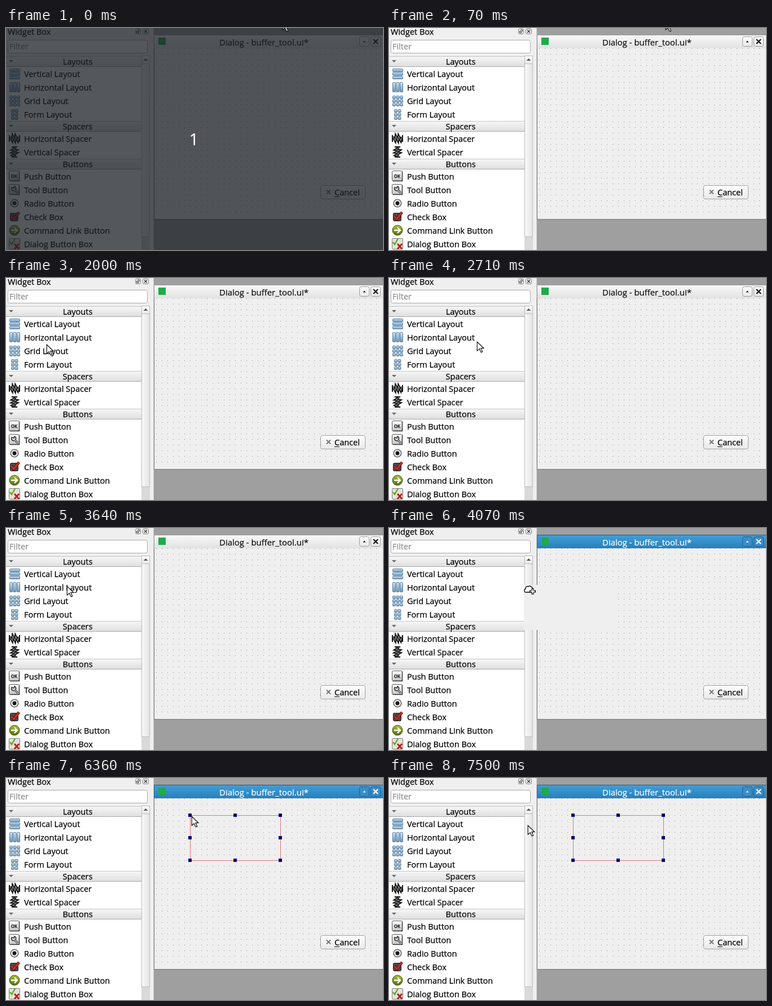
Write an HTML page that moves like this. It is 668x394 px and loops after 8000 ms.

```html
<!DOCTYPE html>
<html lang="en">
<head>
<meta charset="utf-8">
<title>Widget Box</title>
<style>
  html, body { margin: 0; width: 100%; height: 100%; overflow: hidden; background: #9f9f9f; }
  svg { display: block; width: 668px; height: 394px; }
  text { font: 14.5px "Open Sans", "Noto Sans", sans-serif; white-space: pre; }
</style>
</head>
<body>
<svg id="stage" viewBox="0 0 668 394" xmlns="http://www.w3.org/2000/svg"></svg>
<script>
const TICKS_PER_SECOND = 14;
const LOOP = 8000;

const rect = (x, y, w, h, fill, more = '') =>
  `<rect x="${x}" y="${y}" width="${w}" height="${h}" fill="${fill}" ${more}/>`;
const box = (x, y, w, h, fill, line, radius = 0) =>
  rect(x + .5, y + .5, w - 1, h - 1, fill, `stroke="${line}" rx="${radius}"`);
const path = (d, fill, line = 'none', width = 1) =>
  `<path d="${d}" fill="${fill}" stroke="${line}" stroke-width="${width}"/>`;
// A hairline stroke gives the labels their slightly heavier weight.
const text = (x, y, label, fill = '#000', more = '') =>
  `<text x="${x}" y="${y}" fill="${fill}" stroke="${fill}" stroke-width=".25" ${more}>${label}</text>`;
const group = (x, y, body) => `<g transform="translate(${x} ${y})">${body}</g>`;
const middle = 'text-anchor="middle"';
const range = n => [...Array(n).keys()];

const gradient = (id, top, bottom, direction = 'x2="0" y2="1"') =>
  `<linearGradient id="${id}" ${direction}><stop stop-color="${top}"/>` +
  `<stop offset="1" stop-color="${bottom}"/></linearGradient>`;

const defs = `<defs>
  ${gradient('header', '#f7f7f7', '#dedede')}
  ${gradient('button', '#fdfdfd', '#e9e9e9')}
  ${gradient('pane', '#d3e6f5', '#6796bd')}
  ${gradient('idleTitle', '#f8f8f8', '#e2e2e2')}
  ${gradient('activeTitle', '#429ed6', '#267fbd')}
  ${gradient('olive', '#a5bd38', '#536f0b')}
  ${gradient('thumb', '#f9f9f9', '#e4e4e4', '')}
  ${gradient('plate', '#ffffff', '#c4c4c4')}
  <pattern id="grid" x="266" y="36" width="10" height="10" patternUnits="userSpaceOnUse">
    ${rect(0, 0, 1, 1, '#858585')}</pattern>
</defs>`;

// Icons are drawn around their own centre.
const pane = (x, y, w, h) => box(x, y, w, h, 'url(#pane)', '#5b7e9c', 1);
const cells = (columns, rows, left) => range(columns * rows).map(i =>
  pane(left + i % columns * 6.5, -9 + Math.floor(i / columns) * 6.5, 6, 6)).join('');
const plate = box(-10, -10, 19, 19, 'url(#plate)', '#555', 2) +
  path('M-8 8.500H8.500V-8', 'none', '#333', 1.4);
const spring = path('M-9-6V6M9-6V6', 'none', '#111', 2) +
  path('M-8-3 -4 4 -3-4 1 4 2-4 6 4 8-3', 'none', '#111', 4.4) +
  path('M-8-3 -4 4 -3-4 1 4 2-4 6 4 8-3', 'none', '#aaa', 1);

const icons = {
  rows: range(3).map(i => pane(-9, -9 + i * 6.5, 19, 6)).join(''),
  columns: range(3).map(i => pane(-9 + i * 6.5, -9, 6, 18)).join(''),
  grid: cells(3, 3, -9),
  form: cells(2, 3, -6),
  spring,
  uprightSpring: `<g transform="rotate(90) scale(1 .85)">${spring}</g>`,
  push: plate + text(-.5, 2.5, 'OK', '#111', `${middle} style="font-size:8px;font-weight:600"`),
  tool: plate + path('M-5-4 A4 4 0 1 0 0-6 L-1-3 Z', '#ddd', '#333', 1.6) +
    path('M0 0 6 6', 'none', '#444', 3.6) + path('M0 0 6 6', 'none', '#ccc', 1.2),
  radio: '<circle r="6.800" fill="#e8e8e8" stroke="#666" stroke-width="1.600"/><circle r="3.400" fill="#151515"/>',
  check: box(-8, -7, 15, 15, '#4a4a4a', '#222', 2) +
    path('M-6-1 -1 4 8-8', 'none', '#6e0909', 5) + path('M-6-1 -1 4 8-8', 'none', '#c5302c', 3),
  command: '<circle r="9" fill="url(#olive)" stroke="#455a10"/>' +
    path('M-6 0H4M0-5 5 0 0 5', 'none', '#fff', 2.3),
  dialog: box(-10, -10, 20, 20, '#e6e2d9', '#777', 1) +
    path('M-8-3 -5 1 1-9', 'none', '#58a51b', 2.2) + path('M0 0 8 9M8 0 0 9', 'none', '#b91f1b', 2.8)
};

const sections = [
  { y: 50, name: 'Layouts', items: [['Vertical Layout', 'rows'], ['Horizontal Layout', 'columns'],
    ['Grid Layout', 'grid'], ['Form Layout', 'form']] },
  { y: 165, name: 'Spacers', items: [['Horizontal Spacer', 'spring'], ['Vertical Spacer', 'uprightSpring']] },
  { y: 232, name: 'Buttons', items: [['Push Button', 'push'], ['Tool Button', 'tool'],
    ['Radio Button', 'radio'], ['Check Box', 'check'], ['Command Link Button', 'command'],
    ['Dialog Button Box', 'dialog']] }
];

const section = ({ y, name, items }) =>
  rect(0, y, 240, 19, 'url(#header)') + rect(0, y, 240, 1, '#c4c4c4') + rect(0, y + 18, 240, 1, '#a9a9a9') +
  path(`M5 ${y + 7}h8l-4 4z`, '#666') + text(127, y + 15, name, '#000', middle) +
  items.map(([label, icon], i) =>
    group(15, y + 31 + i * 24, icons[icon]) + text(32, y + 37 + i * 24, label)).join('');

const panel = rect(0, 0, 262, 394, '#efefef') + rect(261, 0, 1, 394, '#d2d2d2') +
  text(3, 12, 'Widget Box') +
  box(229, 1, 10, 10, '#f7f7f7', '#777', 2) + box(231, 5, 4, 4, 'none', '#333') +
  path('M233.500 3.500h3v3', 'none', '#333') +
  box(242, 1, 11, 10, '#f7f7f7', '#777', 2) + path('M245 3.500l5 5m0-5l-5 5', 'none', '#333', 1.4) +
  box(3, 21, 248, 24, '#fff', '#aaa', 3) + text(6, 38, 'Filter', '#8d8d8d') +
  rect(0, 50, 240, 344, '#fff') + sections.map(section).join('') +
  rect(240, 50, 15, 344, '#d9d9d9') + box(240, 49, 15, 15, 'url(#button)', '#bbb') +
  path('M243.500 58h8l-4-4z', '#555') + box(240, 63, 15, 308, 'url(#thumb)', '#bbb');

const titleBar = (fill, ink, line, face) =>
  rect(262, 12, 406, 24, line) + rect(263, 13, 405, 23, `url(#${fill})`) +
  rect(270, 17, 13, 13, '#20aa4b') +
  text(457, 30.5, 'Dialog - buffer_tool.ui*', ink, `${middle} style="font-size:14.9px"`) +
  box(626, 15, 18, 18, face, line, 3) + path('M632.500 25.500h5l-2.500-3z', ink) +
  box(646, 15, 18, 18, face, line, 3) + path('M651 20l8 8m0-8l-8 8', 'none', ink, 2.2);

const dialog = rect(262, 12, 406, 328, '#777') + rect(263, 36, 405, 303, '#efefef') +
  rect(266, 36, 400, 300, 'url(#grid)') +
  box(557, 279, 80, 25, 'url(#button)', '#a0a0a0', 3) +
  path('M568 287.500l7 7m0-7l-7 7', 'none', '#777', 2) +
  text(582, 297, 'Cancel') + rect(582, 299, 9, 1, '#000');

const handles = range(9).filter(i => i !== 4).map(i => {
  const x = 323 + i % 3 * 80, y = 63 + Math.floor(i / 3) * 40;
  return rect(x, y, 6, 6, '#0000cf') + rect(x + 1, y + 1, 4, 4, '#000');
}).join('');
const selection = path('M486.500 66V146.500H326', 'none', '#cf777c') +
  path('M326.500 146V66.500H486', 'none', '#ff6a6a') + handles;

const arrow = group(.7, .7,
  path('M.5 .5V16.500L4.500 13 7.500 19.300 10 18.200 7.200 12H12.200Z', '#fff', '#111', 1.2));
const hand = group(0, 1.5,
  path('M1.500 11C0 8 1 6 3 5.500 2.500 2 6 0 7.500 1.500 9 0 12 0 12.500 2 15 2 16 4 15.500 7L14 11.500H3Z',
    '#fff', '#000', 1.3) +
  path('M15.500 4.500v11M10 10h11', 'none', '#000', 4) + path('M15.500 6v8M11.500 10h8', 'none', '#fff', 2));

const part = (id, body) => `<g id="${id}">${body}</g>`;
document.getElementById('stage').innerHTML = defs + rect(0, 0, 668, 394, '#9f9f9f') + dialog +
  part('idle', titleBar('idleTitle', '#111', '#999', 'url(#button)')) +
  part('active', titleBar('activeTitle', '#fff', '#1b5f94', '#3c8dc6')) +
  panel + part('selection', selection) +
  part('widget', rect(0, 0, 160, 80, '#efefef')) +
  part('countdown', rect(0, 0, 668, 394, '#1b1f26', 'opacity=".75"') +
    text(333, 208, '1', '#fff', `${middle} style="font-size:29px"`)) +
  part('arrow', arrow) + part('hand', hand);

// Pointer track: tick, x, y.
const track = [
  [0, 489, -14], [3, 489, -14], [9, 320, 75], [15, 151, 137], [16, 150, 118], [20, 150, 118],
  [31, 42, 117], [32, 42, 117], [38, 155, 112], [39, 155, 112], [43, 48, 117], [44, 48, 117],
  [46, 39, 112], [51, 107, 102], [56, 227, 105], [66, 347, 65], [68, 328, 64], [71, 325, 65],
  [73, 325, 65], [74, 328, 67], [92, 328, 67], [97, 247, 88], [99, 247, 88], [100, 246, 88],
  [101, 246, 88], [102, 245, 85], [103, 245, 84], [104, 245, 84], [105, 245, 83], [112, 245, 83]
];
const DRAG_START = 52, ACTIVATE = 54, DROP = 74;

function pointerAt(tick) {
  const next = Math.max(1, track.findIndex(key => key[0] >= tick));
  const [t0, x0, y0] = track[next - 1], [t1, x1, y1] = track[next];
  const k = (tick - t0) / (t1 - t0);
  return [Math.round(x0 + (x1 - x0) * k), Math.round(y0 + (y1 - y0) * k)];
}

const find = id => document.getElementById(id);
const show = (id, on) => find(id).setAttribute('display', on ? 'inline' : 'none');
const place = (id, x, y) => find(id).setAttribute('transform', `translate(${x} ${y})`);

function draw(ms) {
  // The small lead absorbs times rounded to 10 ms.
  const tick = Math.min(111, Math.floor((ms + 6) * TICKS_PER_SECOND / 1000));
  const [x, y] = pointerAt(tick);
  const dragging = tick >= DRAG_START && tick < DROP;
  show('countdown', tick < 1);
  show('idle', tick < ACTIVATE);
  show('active', tick >= ACTIVATE);
  show('selection', tick >= DROP);
  show('widget', dragging);
  show('hand', dragging);
  show('arrow', !dragging);
  for (const id of ['widget', 'hand', 'arrow']) place(id, x, y);
}

const start = performance.now();
function frame() {
  draw((performance.now() - start) % LOOP);
  requestAnimationFrame(frame);
}
draw(0);
requestAnimationFrame(frame);
</script>
</body>
</html>
```
